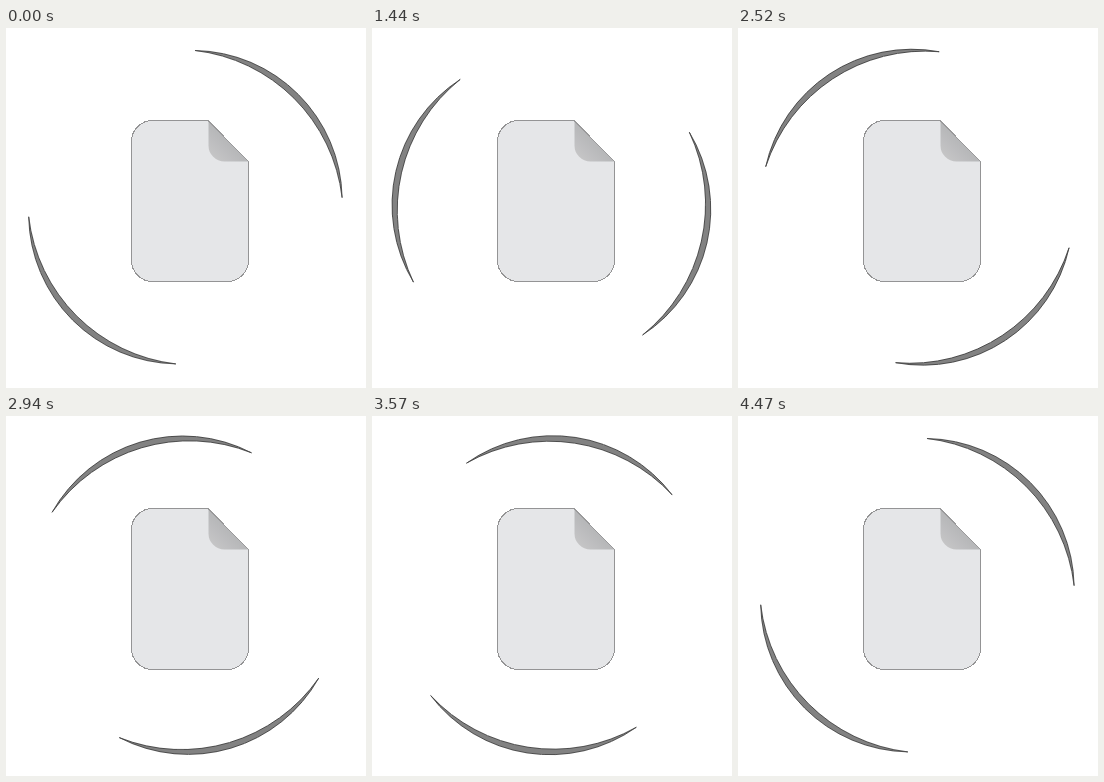
Write an HTML page that moves like this. It is 360 px wide and 360 px high and loops after 4.5 s.

```html
<!DOCTYPE html>
<html lang="en">
<head>
<meta charset="utf-8">
<title>Loading document</title>
<style>
html, body { margin: 0; width: 100%; height: 100%; overflow: hidden; background: #fff; }
svg { display: block; width: 100%; height: 100%; }
</style>
</head>
<body>
<svg viewBox="0 0 360 360">
  <defs>
    <linearGradient id="flap" gradientUnits="userSpaceOnUse" x1="206" y1="130" x2="223" y2="113">
      <stop offset="0" stop-color="#c6c6c7"/>
      <stop offset="1" stop-color="#b5b6b8"/>
    </linearGradient>
    <clipPath id="corner"><path d="M202 93L242.500 133.500H242.500V136H200V93Z"/></clipPath>
    <filter id="soft" x="-20%" y="-20%" width="140%" height="140%"><feGaussianBlur stdDeviation=".7"/></filter>
    <path id="blade" stroke-linejoin="bevel"/>
  </defs>
  <g id="spin" fill="#828282" stroke="#4c4c4c" stroke-width=".9" shape-rendering="crispEdges">
    <use href="#blade"/>
    <use href="#blade" transform="rotate(180)"/>
  </g>
  <path fill="#e5e6e8" stroke="#949495" shape-rendering="crispEdges"
    d="M146.500 92.500H202L242.500 133.500V232.500A21 21 0 0 1 221.500 253.500H146.500A21 21 0 0 1 125.500 232.500V113.500A21 21 0 0 1 146.500 92.500Z"/>
  <g clip-path="url(#corner)">
    <path fill="url(#flap)" filter="url(#soft)" d="M202.500 90V117.500A16 16 0 0 0 218.500 133.500H250V90Z"/>
  </g>
  <path stroke="#9a9a9b" shape-rendering="crispEdges" d="M202 92.500L242.500 133.500"/>
</svg>
<script>
const LOOP = 4500, STEP = 30, LAST = LOOP / STEP - 1, START = 45;
const TIP = 157, HALF = 41.5 * Math.PI / 180, OUTER = 159.6, INNER = 153.8;
const spin = document.getElementById('spin');

const x = TIP * Math.sin(HALF), y = TIP * Math.cos(HALF);
// radius of the arc through both tips that peaks at the given height
const bend = peak => (x * x + (peak - y) ** 2) / (2 * (peak - y));
const arc = (peak, sweep, to) => `A${bend(peak)} ${bend(peak)} 0 0 ${sweep} ${to} ${-y}`;
document.getElementById('blade').setAttribute('d',
  `M${-x} ${-y}${arc(OUTER, 1, x)}${arc(INNER, 0, -x)}Z`);

// half a turn from the first step to the last
function draw(ms) {
  const step = Math.floor((ms % LOOP) / STEP);
  spin.setAttribute('transform', `translate(179.400 179.200) rotate(${START + 180 * step / LAST})`);
}

function tick() {
  draw(performance.now());
  requestAnimationFrame(tick);
}
draw(0);
tick();
</script>
</body>
</html>
```
